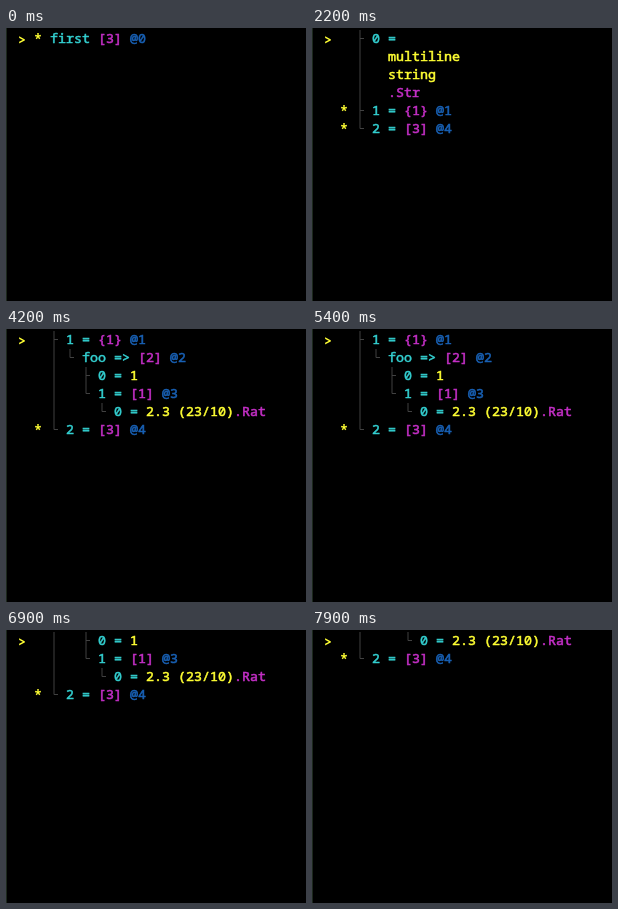
Animation, 300 px wide and 273 px high, one loop 8000 ms. Source, as an HTML page:

```html
<!DOCTYPE html>
<html lang="en">
<head>
<meta charset="utf-8">
<title>Tree browser</title>
<style>
  html, body { margin: 0; width: 100%; height: 100%; overflow: hidden; background: #000; }
  svg { display: block; width: 300px; height: 273px; }
  text { font: 13.333px "Noto Sans Mono", "DejaVu Sans Mono", monospace; white-space: pre; stroke-width: .55; }
  .mark { font-weight: 700; stroke-width: 0; }
  path { fill: none; stroke: #414141; stroke-width: 1; }
</style>
</head>
<body>
<svg viewBox="0 0 300 273">
  <rect width="300" height="273" fill="#000"/>
  <rect width="1" height="273" fill="#1c281c"/>
  <g id="screen"></g>
</svg>
<script>
const LOOP = 8000, CELL = 8, LINE = 18, LEFT = 12, TOP = 2, BASELINE = 13.3;
const COLORS = { key: '#33cfd0', type: '#c42fc6', ref: '#1860b4', value: '#ffff33' };

const row = (tree, ...parts) => ({ tree, parts });
const key = text => ['key', text];
const type = text => ['type', text];
const ref = text => ['ref', text];
const value = text => ['value', text];
const folded = line => ({ ...line, folded: true });

const root = row('', key('first'), type('[3]'), ref('@0'));
const string = [
  row('├', key('0 =')),
  row('│  ', value('multiline')),
  row('│  ', value('string')),
  row('│  ', type('.Str')),
];
const hash = row('├', key('1 ='), type('{1}'), ref('@1'));
const hashItems = [
  row('│ └', key('foo =>'), type('[2]'), ref('@2')),
  row('│   ├', key('0 ='), value('1')),
  row('│   └', key('1 ='), type('[1]'), ref('@3')),
  row('│     └', key('0 ='), value('2.3 (23/10)'), type('.Rat')),
];
const last = folded(row('└', key('2 ='), type('[3]'), ref('@4')));

const closed = [folded(root)];
const opened = [root, ...string, folded(hash), last];
const expanded = [root, ...string, hash, ...hashItems, last];

// Start time, visible tree, index of the top line
const steps = [
  [0, closed, 0],
  [200, opened, 0],
  [2200, opened, 1],
  [2500, opened, 2],
  [2800, opened, 3],
  [3200, opened, 4],
  [3500, opened, 5],
  [3800, expanded, 5],
  [6500, expanded, 6],
  [6800, expanded, 7],
  [7200, expanded, 8],
  [7600, expanded, 9],
];

const columnX = column => LEFT + column * CELL;

function textAt(column, y, text, color, cls = '') {
  const safe = text.replace(/>/g, '&gt;');
  const paint = COLORS[color];
  return `<text class="${cls}" x="${columnX(column)}" y="${y + BASELINE}" fill="${paint}" stroke="${paint}">${safe}</text>`;
}

const mark = (column, y, char) => textAt(column, y, char, 'value', 'mark');

function branch(char, column, y) {
  const x = columnX(column) + 4, middle = y + 8.5;
  const bottom = char === '└' ? middle : y + LINE;
  const arm = char === '│' ? '' : `M${x} ${middle}h4`;
  return `<path d="M${x} ${y}V${bottom}${arm}"/>`;
}

function drawRow({ tree, parts, folded }, index) {
  const y = TOP + index * LINE;
  let out = folded ? mark(2, y + 1, '*') : '';
  [...tree].forEach((char, i) => {
    if (char !== ' ') out += branch(char, 4 + i, y);
  });
  let column = 4 + (tree ? tree.length + 1 : 0);
  parts.forEach(([color, text], i) => {
    if (i && text[0] !== '.') column++;
    out += textAt(column, y, text, color);
    column += text.length;
  });
  return out;
}

const screen = document.getElementById('screen');
let shown;

function render(time) {
  const step = steps.findLast(([start]) => start <= time);
  if (step === shown) return;
  shown = step;
  const [, lines, top] = step;
  screen.innerHTML = mark(0, TOP + 2, '>') + lines.slice(top).map(drawRow).join('');
}

function tick() {
  render(performance.now() % LOOP);
  requestAnimationFrame(tick);
}
tick();
</script>
</body>
</html>
```
